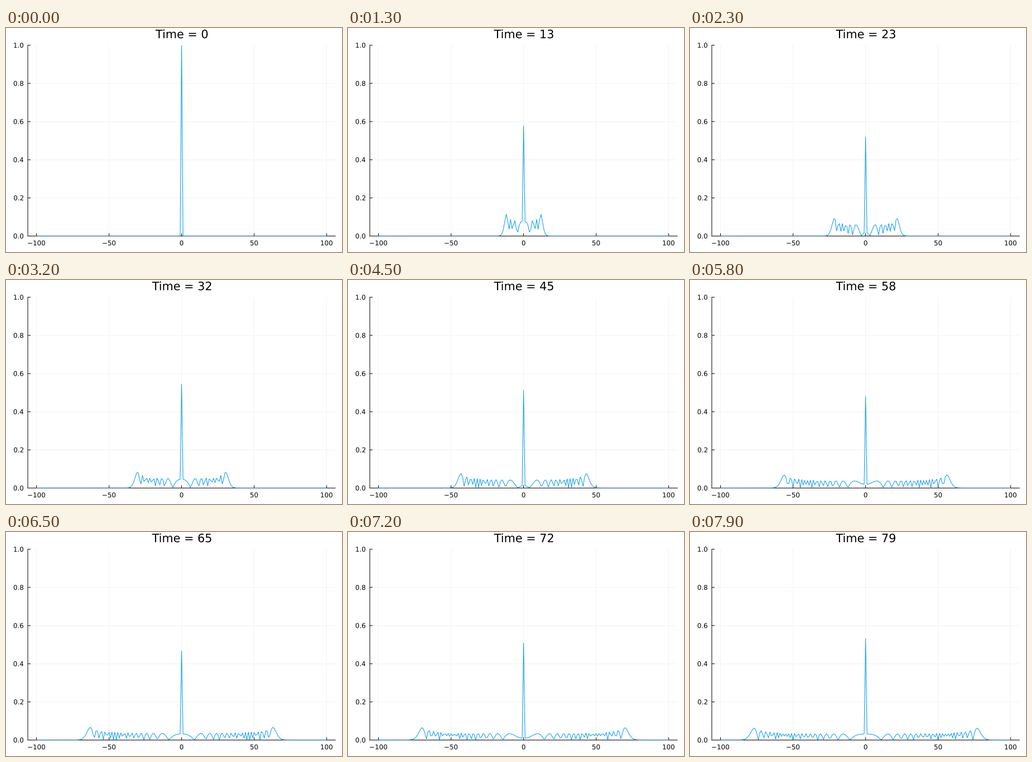
A matplotlib script for the animation above (8 s loop, 600 by 400 pixels).

```python
import numpy as np
import matplotlib.pyplot as plt
from matplotlib.animation import FuncAnimation
from matplotlib.patches import PathPatch
from matplotlib.path import Path
from matplotlib.textpath import TextPath
from matplotlib.transforms import Affine2D

W, H, DPI = 600, 400, 100
LEFT, RIGHT, TOP, BOTTOM = 38.96, 588.19, 30.8, 371.5
PX = 72 / DPI  # one pixel in points
TICK, GAP = 5, 8
LABEL_SIZE, TITLE_SIZE = 11.85, 20.7
FRAMES, INTERVAL = 80, 100

sites = np.arange(-100, 101)
theta = 2 * np.pi * np.arange(1024) / 1024


def amplitude(t):
    """Half stays on the central site, half spreads as J_2n(2t)."""
    bessel = np.fft.fft(np.exp(2j * t * np.sin(theta))).real / theta.size
    return np.abs(0.5 * (sites == 0) + 0.5 * bessel[2 * np.abs(sites)])


def text_path(x, baseline, text, size, align=0.5):
    """Outline of a text whose inked width is aligned at x, in pixels."""
    path = TextPath((0, 0), text, size=size)
    box = path.get_extents()
    shift = x - box.x0 - align * box.width
    return path.transformed(Affine2D().translate(shift, H - baseline))


def add_text(*args, **kwargs):
    patch = PathPatch(text_path(*args, **kwargs), facecolor="black",
                      linewidth=0, transform=to_pixels)
    return fig.add_artist(patch)


plt.rcParams["font.family"] = "DejaVu Sans"
plt.rcParams["path.snap"] = False
fig = plt.figure(figsize=(W / DPI, H / DPI), dpi=DPI, facecolor="white")
to_pixels = Affine2D().scale(1 / W, 1 / H) + fig.transFigure
ax = fig.add_axes([LEFT / W, 1 - BOTTOM / H,
                   (RIGHT - LEFT) / W, (BOTTOM - TOP) / H])
ax.set(xlim=(-106, 106), ylim=(0, 1))

xticks = np.arange(-100, 101, 50)
yticks = np.arange(6) / 5
ax.set_xticks(xticks)
ax.set_yticks(yticks)
ax.set_axisbelow(True)
ax.grid(color="black", alpha=0.1, linewidth=0.5 * PX)
ax.tick_params(length=0, labelbottom=False, labelleft=False)
for side, spine in ax.spines.items():
    spine.set_linewidth(PX)
    spine.set_visible(side in ("left", "bottom"))

style = dict(color="black", linewidth=PX, clip_on=False, zorder=1)
ax.vlines(xticks, 0, TICK / (BOTTOM - TOP), **style)
ax.hlines(yticks, -106, -106 + 212 * TICK / (RIGHT - LEFT), **style)

cap = 0.729 * LABEL_SIZE
for v in xticks:
    x = LEFT + (v + 106) / 212 * (RIGHT - LEFT)
    add_text(x, BOTTOM + GAP + cap, str(v).replace("-", "\u2212"), LABEL_SIZE)
for v in yticks:
    y = BOTTOM - v * (BOTTOM - TOP)
    add_text(LEFT - GAP, y + cap / 2, f"{v:.1f}", LABEL_SIZE, align=1)


def title_path(t):
    return text_path((LEFT + RIGHT) / 2, 18.2, f"Time = {t}", TITLE_SIZE)


title = fig.add_artist(PathPatch(title_path(0), facecolor="black",
                                 linewidth=0, transform=to_pixels))
curve, = ax.plot(sites, amplitude(0), color="#009AFA", linewidth=PX,
                 solid_joinstyle="miter", zorder=3)
# An antialiased clip keeps only the upper half of the line on the axis.
curve.set_clip_box(None)
curve.set_clip_path(Path.unit_rectangle(), ax.transAxes)


def update(t):
    curve.set_ydata(amplitude(t))
    title.set_path(title_path(t))
    return curve, title


anim = FuncAnimation(fig, update, frames=FRAMES, interval=INTERVAL,
                     repeat=True, repeat_delay=0, blit=False)
plt.show()
```
